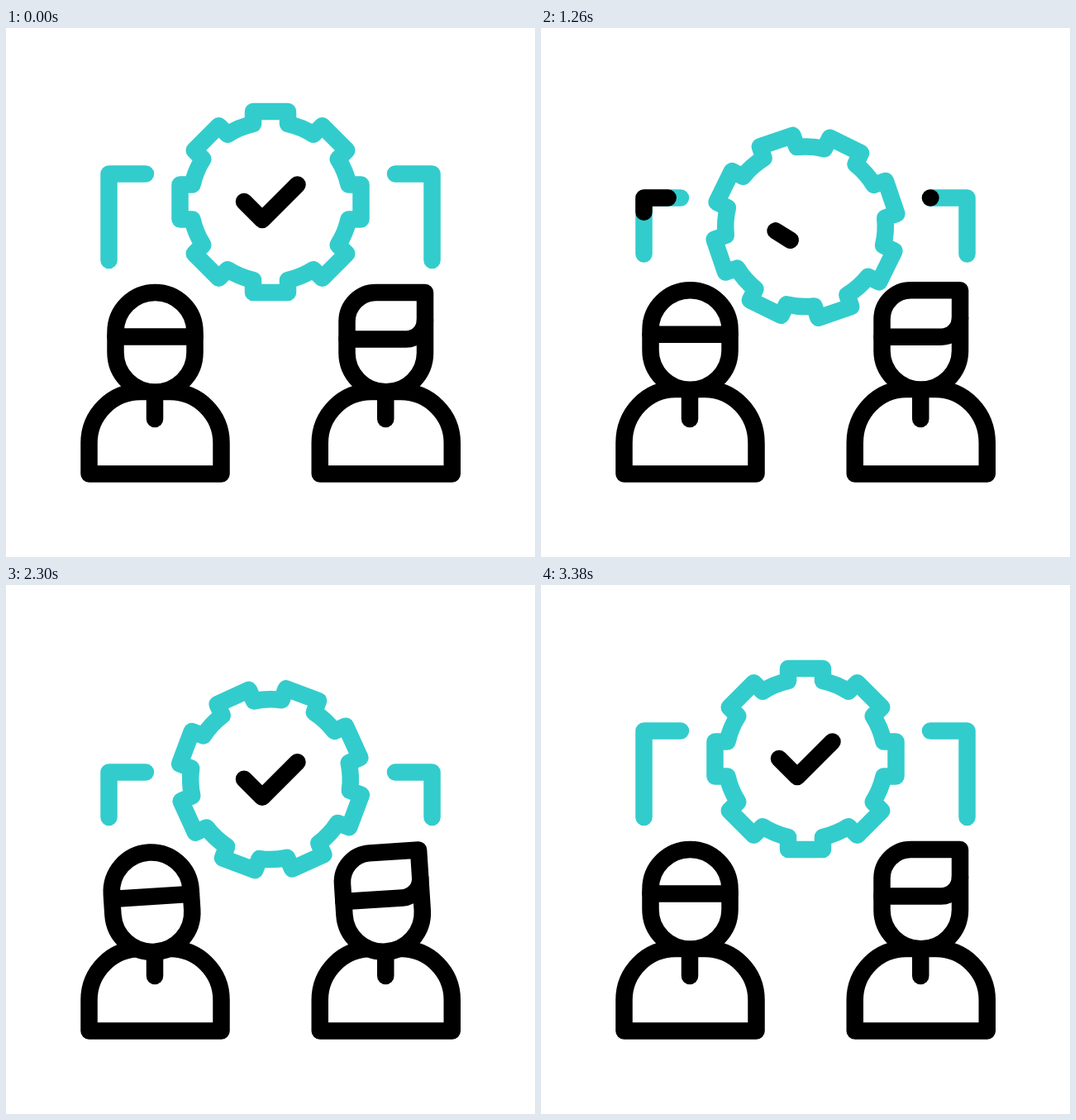
These frames come from a looping animation (640x640 px, 3.6 s). An HTML page with a canvas:

```html
<!DOCTYPE html>
<html lang="en">
<head>
<meta charset="utf-8">
<title>Teamwork icon</title>
<style>
  html, body { margin: 0; width: 100%; height: 100%; overflow: hidden; background: #fff; }
  canvas { display: block; width: 640px; height: 640px; }
</style>
</head>
<body>
<canvas id="stage" width="640" height="640"></canvas>
<script>
const ctx = document.getElementById('stage').getContext('2d');
const LOOP = 3600, TEAL = '#33cccc', BLACK = '#000';

const clamp = x => Math.min(1, Math.max(0, x));
const smooth = x => (x = clamp(x), x * x * (3 - 2 * x));

// Swings from rest through evenly timed poses and back to rest
const swing = (first, step) => (t, rest, ...poses) => {
  const beat = t < first ? t / first : 1 + (t - first) / step;
  const points = [rest, ...poses, rest], i = Math.floor(beat);
  const from = points[i] ?? rest, to = points[i + 1] ?? rest;
  return from + (to - from) * smooth(beat - i);
};
const bounce = swing(700, 500);
const nod = swing(520, 520);

// One full turn at steady speed with equal ramps at both ends
function gearTurn(t) {
  const speed = .175, ramp = 680, end = 360 / speed + ramp;
  const ease = x => speed * x * x / (2 * ramp);
  if (t < ramp) return ease(t);
  if (t > end - ramp) return 360 - ease(Math.max(0, end - t));
  return speed * (t - ramp / 2);
}

function stroke(path, color) {
  ctx.strokeStyle = color;
  ctx.stroke(path);
}

function strokePart(path, length, from, to, color) {
  if (to < .002 || from >= 1) return;
  ctx.setLineDash([Math.max(.01, (to - from) * length), 9999]);
  ctx.lineDashOffset = -from * length;
  stroke(path, color);
  ctx.setLineDash([]);
}

function placed(x, y, degrees, draw) {
  ctx.save();
  ctx.translate(x, y);
  ctx.rotate(degrees * Math.PI / 180);
  draw();
  ctx.restore();
}

function makeGear(teeth) {
  const path = new Path2D(), half = 21, base = 94.5, top = 109.5;
  const radius = Math.hypot(half, base), lean = Math.atan2(half, base);
  const pitch = 2 * Math.PI / teeth;
  for (let i = 0; i < teeth; i++) {
    const a = i * pitch, c = Math.cos(a), s = Math.sin(a), up = a - Math.PI / 2;
    const line = (x, y) => path.lineTo(x * c + y * s, x * s - y * c);
    line(-half, base);
    line(-half, top);
    line(half, top);
    line(half, base);
    path.arc(0, 0, radius, up + lean, up + pitch - lean);
  }
  path.closePath();
  return path;
}

const gear = makeGear(8);
const check = new Path2D('M-22 -22L0 0L42.5 -42.5');
const checkLength = 64.5 * Math.SQRT2;

const people = [
  { x: 180.5,
    head: new Path2D('M132.5 368A48 48 0 0 1 228.5 368V392.5A48 48 0 0 1 132.5 392.5Z'),
    hair: new Path2D('M132.5 373.5H228.5') },
  { x: 459.75,
    head: new Path2D('M412.5 355A35 35 0 0 1 447.5 320H507V393A47.25 47.25 0 0 1 412.5 393Z'),
    hair: new Path2D('M412.5 376.5H484A23 23 0 0 0 507 353.5') }
];

// A black pulse climbs the left bracket, then runs down the right one, twice
function drawBrackets(t) {
  const top = 176.5 + bounce(t, 0, -28.7, 30, 6.6, 56);
  const end = 281 + bounce(t, 0, 13, -8, 6.5, 0);
  const length = 44.5 + end - top;
  const left = new Path2D(`M124.5 ${end}V${top}H169`);
  const right = new Path2D(`M471 ${top}H515.5V${end}`);
  for (const [path, start] of [[left, 0], [right, 440]]) {
    stroke(path, TEAL);
    for (const begin of [start, start + 800]) {
      const front = smooth((t - begin) / 600), tail = smooth((t - begin - 180) / 600);
      strokePart(path, length, tail, front, BLACK);
    }
  }
}

function drawGear(t) {
  const y = bounce(t, 0, -43.5, 32, -22.5, 27.6);
  placed(320, 210.5 + y, gearTurn(t), () => stroke(gear, TEAL));
  const trim = bounce(t, 1, .31, .2, 1, 1);
  placed(310, 232 + y, bounce(t, 0, -31, -14, 6, 0), () =>
    strokePart(check, checkLength, 0, trim * 1.01, BLACK));
}

function drawPerson({ x, head, hair }, t) {
  const neck = 440 + nod(t, 0, -4.5, -4, -1.5), rise = 502 - neck;
  stroke(new Path2D(`M${x - 80} 539.5V502A62 ${rise} 0 0 1 ${x - 18} ${neck}H${x + 18}
    A62 ${rise} 0 0 1 ${x + 80} 502V539.5Z`), BLACK);
  stroke(new Path2D(`M${x - .5} 445V473`), BLACK);
  placed(x, 442 + nod(t, 0, 13, -9.7, 8.3, 4.8, 1), nod(t, 0, -10.6, -1.6, 2.6, -6.6, .9), () => {
    ctx.translate(-x, -442);
    ctx.fillStyle = '#fff';
    ctx.fill(head);
    stroke(hair, BLACK);
    stroke(head, BLACK);
  });
}

function draw(t) {
  ctx.fillStyle = '#fff';
  ctx.fillRect(0, 0, 640, 640);
  ctx.lineWidth = 20.5;
  ctx.lineCap = ctx.lineJoin = 'round';
  drawBrackets(t);
  drawGear(t);
  people.forEach(person => drawPerson(person, t));
}

const begin = performance.now();
function frame() {
  draw((performance.now() - begin) % LOOP);
  requestAnimationFrame(frame);
}
frame();
</script>
</body>
</html>
```
